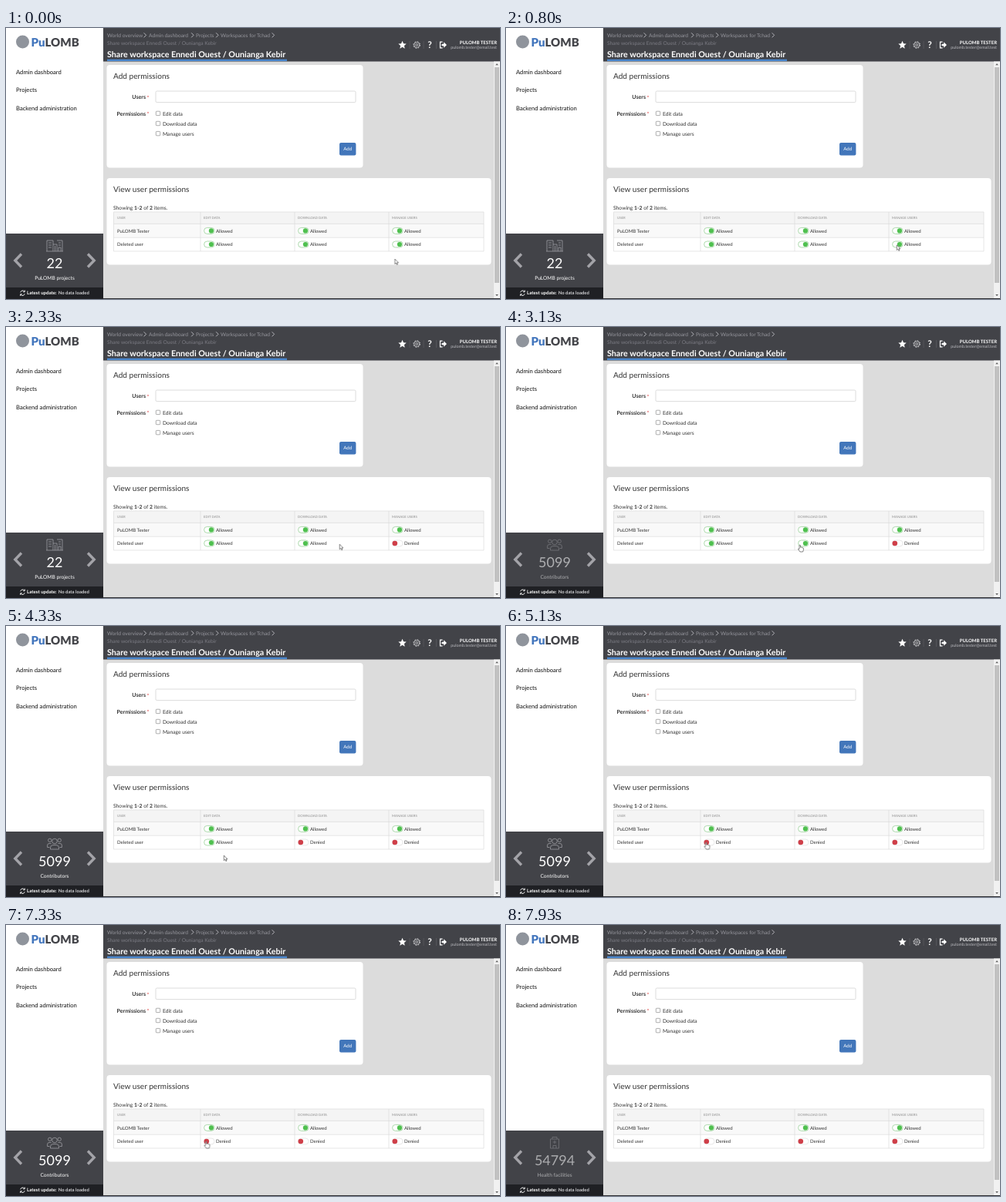
Animation, 640 px wide and 352 px high, one loop 8000 ms. Source, as an HTML page:

```html
<!DOCTYPE html>
<html lang="en">
<head>
<meta charset="utf-8">
<title>Share workspace</title>
<style>
html, body { margin: 0; width: 100%; height: 100%; overflow: hidden; background: #dcdcdc; }
svg { display: block; width: 100vw; height: 100vh; }
text { font-family: Lato, "Open Sans", sans-serif; fill: #333; text-rendering: geometricPrecision; white-space: pre; }
.b { font-weight: 700; }
.mid { text-anchor: middle; }
.end { text-anchor: end; }
.logo { font-size: 15px; font-weight: 900; fill: #44454a; }
.logo tspan { fill: #4376bd; }
.menu text { font-size: 7.67px; fill: #111; }
.crumbs text { font-size: 6.65px; fill: #96969d; }
.crumbs .sub { fill: #7c7c84; }
.sep { fill: none; stroke: #b5b5bb; stroke-width: 1; }
.title { font-size: 10.7px; fill: #fff; }
.head { font-size: 10.1px; }
.label { font-size: 7.05px; }
.opt { font-size: 6.7px; }
.star { font-size: 7px; fill: #d33; }
.th { font-size: 4.3px; fill: #8c8c8c; }
.td { font-size: 6.05px; }
.num { font-size: 18px; fill: #fff; }
.cap { font-size: 6.65px; fill: #fff; }
.line { fill: none; stroke: #9d9da3; stroke-width: .8; }

.tog { --on: 1; }
.yes { opacity: var(--on); }
.no { opacity: calc(1 - var(--on)); }
.t1 { animation: off1 8s step-end infinite; }
.t2 { animation: off2 8s step-end infinite; }
.t3 { animation: off3 8s step-end infinite; }
@keyframes off1 { 0% { --on: 1; } 63.75% { --on: 0; } 100% { --on: 0; } }
@keyframes off2 { 0% { --on: 1; } 41.9% { --on: 0; } 100% { --on: 0; } }
@keyframes off3 { 0% { --on: 1; } 14.4% { --on: 0; } 100% { --on: 0; } }

.s1 { animation: s1 8s linear infinite; }
.s2 { animation: s2 8s linear infinite; }
.s3 { animation: s3 8s linear infinite; }
@keyframes s1 { 0%, 33.5% { opacity: 1; } 36%, 100% { opacity: 0; } }
@keyframes s2 { 0%, 36% { opacity: 0; } 41.5%, 93.75% { opacity: 1; } 96.25%, 100% { opacity: 0; } }
@keyframes s3 { 0%, 96.25% { opacity: 0; } 100% { opacity: .72; } }

.cursor { --on: 0; animation: move 8s ease-in-out infinite, hand 8s step-end infinite; }
.cursor path { fill: #fff; stroke: #333; stroke-width: .6; stroke-linejoin: round; }
@keyframes move {
  0%, 4% { transform: translate(503.5px, 300px); }
  11%, 25% { transform: translate(506px, 281px); }
  32.5%, 46.5% { transform: translate(380px, 283px); }
  53%, 55% { transform: translate(282px, 298px); }
  61%, 94% { transform: translate(258.5px, 281px); }
  99%, 100% { transform: translate(276px, 360px); }
}
@keyframes hand {
  0% { --on: 0; } 10.6% { --on: 1; } 25.8% { --on: 0; } 31.9% { --on: 1; }
  47.8% { --on: 0; } 60% { --on: 1; } 94.6% { --on: 0; } 100% { --on: 0; }
}
</style>
</head>
<body>
<svg viewBox="0 0 640 352" preserveAspectRatio="none">
  <defs>
    <g id="tog">
      <g class="yes">
        <rect x=".6" y="-4" width="13.4" height="8" rx="4" fill="#fff" stroke="#8ccb8c" stroke-width=".7"/>
        <circle cx="9.9" r="3.1" fill="#4fc04f"/>
        <text class="td" x="16" y="2.2">Allowed</text>
      </g>
      <g class="no">
        <rect x=".6" y="-4" width="13.4" height="8" rx="4" fill="#fff" stroke="#dedede" stroke-width=".7"/>
        <circle cx="3.8" r="3.3" fill="#cf3f49"/>
        <text class="td" x="16" y="2.2">Denied</text>
      </g>
    </g>
    <path id="sep" class="sep" d="M-1.4 -3 L1.6 0 L-1.4 3"/>
    <rect id="box" x="194.3" y="-2.8" width="5.4" height="5.4" rx=".8" fill="#fff" stroke="#8c8c8c" stroke-width=".7"/>
  </defs>

  <rect width="640" height="352" fill="#dcdcdc"/>

  <!-- sidebar -->
  <rect width="126" height="352" fill="#fff"/>
  <circle cx="21.5" cy="18" r="8.5" fill="#8f949c"/>
  <text class="logo" x="32.5" y="23.6"><tspan>Pu</tspan>LOMB</text>
  <g class="menu">
    <text x="13" y="59.6">Admin dashboard</text>
    <text x="13" y="83.3">Projects</text>
    <text x="13" y="107">Backend administration</text>
  </g>
  <rect y="267" width="126" height="70" fill="#424348"/>
  <rect y="337" width="126" height="15" fill="#1f2024"/>
  <g fill="none" stroke="#a3a3a8" stroke-width="3.4">
    <path d="M20 293.5 L11.8 302 L20 310.5"/>
    <path d="M106 293.5 L114.2 302 L106 310.5"/>
  </g>

  <g class="s1">
    <g class="line">
      <path d="M52 290 H74 M53 290 V276 H61 V290 M55 279 H59 M55 282 H59 M55 285 H59"/>
      <path d="M61 281 H66 V290 M63.5 283 V290"/>
      <path d="M66 276 H73 V290 M68 279 H71 M68 282 H71 M68 290 V285 H71 V290"/>
    </g>
    <text class="num mid" x="63" y="311.6">22</text>
    <text class="cap mid" x="63" y="326.8">PuLOMB projects</text>
  </g>
  <g class="s2">
    <g class="line">
      <circle cx="63" cy="279.5" r="3.3"/>
      <path d="M57.5 290 V288 Q57.5 284.5 61 284.5 H65 Q68.5 284.5 68.5 288 V290 Z"/>
      <circle cx="56.8" cy="278.3" r="2.2"/>
      <circle cx="69.2" cy="278.3" r="2.2"/>
      <path d="M56.5 287.5 H53.6 V285 Q53.6 282.5 56 282.5 H58.5 M69.5 287.5 H72.4 V285 Q72.4 282.5 70 282.5 H67.5"/>
    </g>
    <text class="num mid" x="63" y="311.6">5099</text>
    <text class="cap mid" x="63" y="326.8">Contributors</text>
  </g>
  <g class="s3">
    <g class="line">
      <path d="M57.5 290 V278 H68.5 V290 Z M60 278 V275.5 H66 V278"/>
      <path d="M63 279.8 V284.2 M60.8 282 H65.2 M61 290 V286.5 H65 V290"/>
    </g>
    <text class="num mid" x="63" y="311.6">54794</text>
    <text class="cap mid" x="63" y="326.8">Health facilities</text>
  </g>

  <g fill="none" stroke="#fff" stroke-width=".9">
    <path d="M18.8 343.4 A2.8 2.8 0 0 1 23.8 342.2 M24.2 345.2 A2.8 2.8 0 0 1 19.2 346.4"/>
    <path d="M24.3 340.6 V342.8 H22.1 M18.7 348 V345.8 H20.9"/>
  </g>
  <text class="b" x="27" y="346.4" style="font-size:6.1px;fill:#fff">Latest update:</text>
  <text class="b" x="67.7" y="346.4" style="font-size:5.95px;fill:#cfcfd2">No data loaded</text>

  <!-- top bar -->
  <rect x="126" width="514" height="43.5" fill="#424348"/>
  <g class="crumbs">
    <text x="131" y="11.9">World overview</text>
    <text x="185" y="11.9">Admin dashboard</text>
    <text x="246" y="11.9">Projects</text>
    <text x="278" y="11.9">Workspaces for Tchad</text>
    <text class="sub" x="131" y="21.9">Share workspace Ennedi Ouest / Ounianga Kebir</text>
    <use href="#sep" x="180" y="9.3"/>
    <use href="#sep" x="241.5" y="9.3"/>
    <use href="#sep" x="273.5" y="9.3"/>
    <use href="#sep" x="346" y="9.3"/>
  </g>
  <text class="title b" x="131" y="37.5">Share workspace Ennedi Ouest / Ounianga Kebir</text>
  <rect x="131" y="40.6" width="233" height="2.4" fill="#4a86cc"/>

  <path stroke="#5c5d63" stroke-width=".7" d="M523 17 V27 M541 17 V27 M557.5 17 V27"/>
  <path fill="#fff" d="M513.5 16.8 L515 20.2 L518.7 20.6 L515.9 23.1 L516.7 26.7 L513.5 24.8 L510.3 26.7 L511.1 23.1 L508.3 20.6 L512 20.2 Z"/>
  <g fill="none" stroke="#d2d2d5">
    <circle cx="532.2" cy="22" r="3.5" stroke-width=".8"/>
    <circle cx="532.2" cy="22" r="4.3" stroke-width="1" stroke-dasharray="1.69 1.69"/>
    <circle cx="532.2" cy="22" r="1.4" stroke-width=".8"/>
  </g>
  <text class="b mid" x="549" y="26" style="font-size:12px;fill:#fff">?</text>
  <path fill="none" stroke="#fff" stroke-width="1.2" d="M565.5 18.2 H562.5 V25.8 H565.5"/>
  <path fill="#fff" d="M564.5 20.8 H567.2 V18.3 L571 22 L567.2 25.7 V23.2 H564.5 Z"/>
  <text class="b end" x="636" y="20.7" style="font-size:6px;fill:#fff">PULOMB TESTER</text>
  <text class="end" x="636" y="26.8" style="font-size:5.35px;fill:#bcbcc0">pulomb.tester@email.test</text>

  <!-- scrollbar -->
  <rect x="632" y="43.5" width="8" height="308.5" fill="#f1f1f1"/>
  <rect x="633" y="51" width="6" height="280" fill="#c1c1c1"/>
  <path fill="#606060" d="M634.2 48.2 L636 46 L637.8 48.2 Z M634.2 346 L636 348.2 L637.8 346 Z"/>

  <!-- add form -->
  <rect x="130.5" y="48" width="332" height="133.5" rx="4" fill="#fff"/>
  <text class="head" x="139" y="66.1">Add permissions</text>
  <text class="label b end" x="181" y="92">Users</text>
  <text class="star" x="182.6" y="92.6">*</text>
  <rect x="194" y="82" width="259" height="14.6" rx="1.5" fill="#fff" stroke="#cdcdcd" stroke-width=".7"/>
  <text class="label b end" x="181" y="113.6">Permissions</text>
  <text class="star" x="182.6" y="114.2">*</text>
  <use href="#box" y="111"/>
  <use href="#box" y="124.1"/>
  <use href="#box" y="137.2"/>
  <text class="opt" x="203" y="113.5">Edit data</text>
  <text class="opt" x="203" y="126.6">Download data</text>
  <text class="opt" x="203" y="139.7">Manage users</text>
  <rect x="432" y="149" width="21.4" height="16.4" rx="2" fill="#4276ba"/>
  <text class="mid" x="442.7" y="159.3" style="font-size:6.1px;fill:#fff">Add</text>

  <!-- permission table -->
  <rect x="130.5" y="195" width="498" height="112.5" rx="4" fill="#fff"/>
  <text class="head" x="139" y="213.3">View user permissions</text>
  <text x="139" y="236" style="font-size:6.75px">Showing <tspan class="b">1-2</tspan> of <tspan class="b">2</tspan> items.</text>
  <rect x="139.5" y="239" width="479.5" height="15.4" fill="#f4f4f4"/>
  <rect x="139.5" y="254.4" width="479.5" height="17.8" fill="#f9f9f9"/>
  <path fill="none" stroke="#dcdcdc" stroke-width=".7" d="M139.5 239 H619 V290 H139.5 Z M139.5 254.4 H619 M139.5 272.2 H619 M252 239 V290 M374 239 V290 M496 239 V290"/>
  <text class="th" x="144" y="248">USER</text>
  <text class="th" x="256" y="248">EDIT DATA</text>
  <text class="th" x="378" y="248">DOWNLOAD DATA</text>
  <text class="th" x="500" y="248">MANAGE USERS</text>
  <text class="td" x="144" y="265.6">PuLOMB Tester</text>
  <text class="td" x="144" y="283.2">Deleted user</text>
  <use class="tog" href="#tog" x="256" y="263.4"/>
  <use class="tog" href="#tog" x="378" y="263.4"/>
  <use class="tog" href="#tog" x="500" y="263.4"/>
  <use class="tog t1" href="#tog" x="256" y="281"/>
  <use class="tog t2" href="#tog" x="378" y="281"/>
  <use class="tog t3" href="#tog" x="500" y="281"/>

  <rect x="126" y="351" width="514" height="1" fill="#2c2d31"/>

  <g class="cursor">
    <path class="no" d="M.3 0 V6.6 L1.9 5.2 L2.9 7.5 L4 7 L3 4.8 H5 Z"/>
    <path class="yes" d="M0 .6 Q.8 -.4 1.5 .6 V3.2 Q2.3 2.7 2.9 3.4 Q3.7 3 4.2 3.8 Q5.2 3.5 5.4 4.5 V6.5 L4.6 9 H1 L-1.6 5.6 Q-1.4 4.4 0 5.4 Z"/>
  </g>
</svg>
</body>
</html>
```
